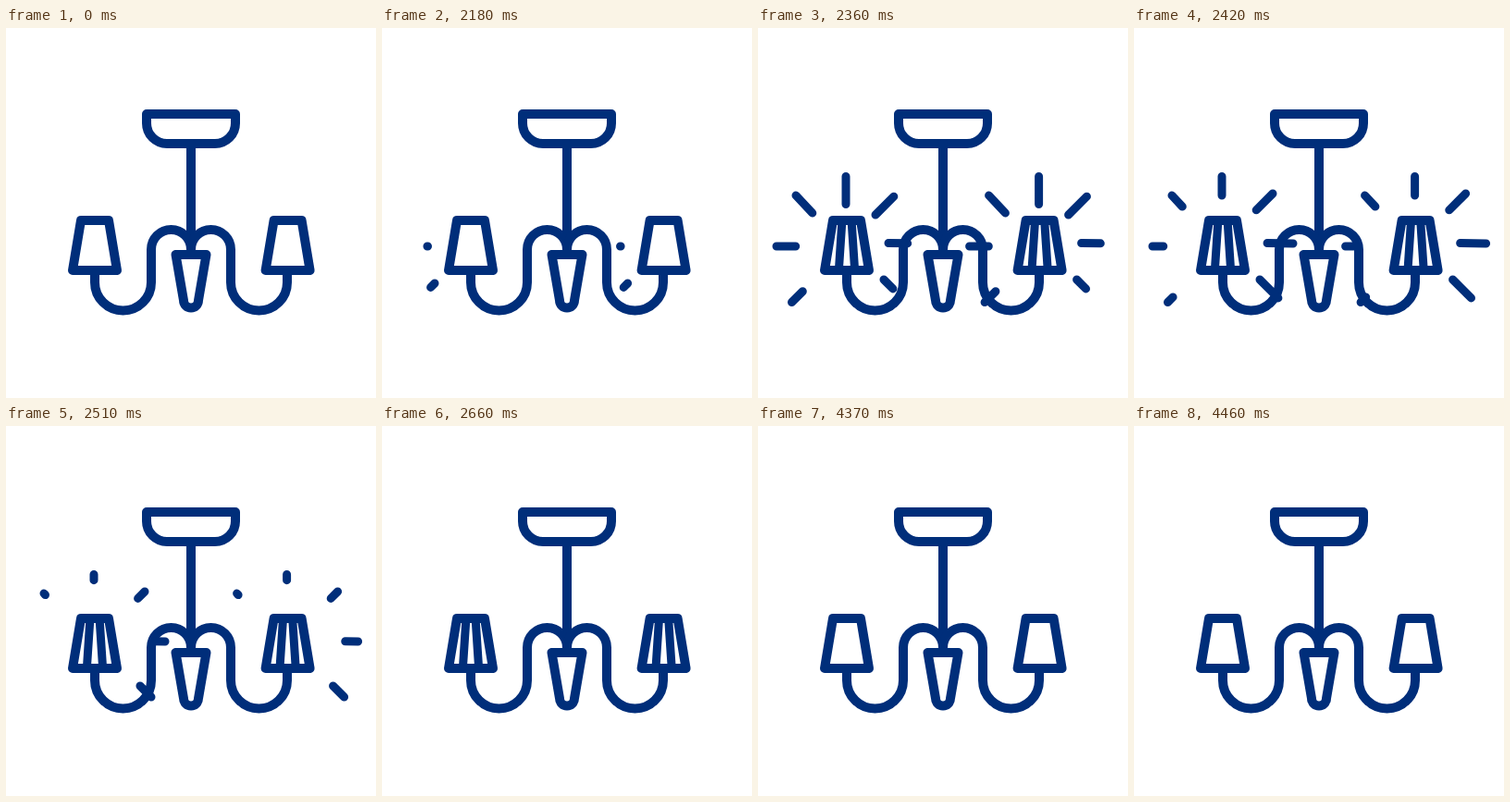
Recreate the animation shown at these times as an HTML page. Size 400 px wide and 400 px high, loop 4.49 s.

```html
<!DOCTYPE html>
<html lang="en">
<head>
<meta charset="utf-8">
<title>Chandelier</title>
<style>
html, body { margin: 0; width: 100%; height: 100%; overflow: hidden; background: #fff; }
svg { display: block; width: 100vw; height: 100vh; }
</style>
</head>
<body>
<svg viewBox="0 0 400 400" fill="none" stroke="#002e7a" stroke-width="10" stroke-linecap="round" stroke-linejoin="round">
  <defs>
    <path id="arm" d="M96 262V275A30.5 30.5 0 0 0 157 275V239.5A21.5 21.5 0 0 1 200 239.5"/>
    <g id="lamp">
      <path d="M81 208H111L120 262H72Z"/>
      <path class="pleats" stroke-width="9" d="M90.8 210L87.5 260M101.2 210L104.5 260"/>
      <path class="rays" stroke-width="9"/>
    </g>
  </defs>
  <path d="M152 93H248V103A22 22 0 0 1 226 125H174A22 22 0 0 1 152 103Z"/>
  <path d="M200 125V240"/>
  <use href="#arm"/>
  <use href="#arm" transform="translate(400) scale(-1 1)"/>
  <path d="M183.5 245H216.5L208 294.5A8 8 0 0 1 192 294.5Z"/>
  <use href="#lamp"/>
  <use href="#lamp" x="208.6"/>
</svg>
<script>
const LOOP = 4490, BURST = 2180, STEP = 30;
const pleats = document.querySelector('.pleats');
const rays = document.querySelector('.rays');

// Inner and outer end of each ray, in firing order
const RAYS = [
  [57, 276, 36.5, 296.5],
  [49.5, 236, 20, 236],
  [62.5, 204, 41, 181],
  [95, 192, 95, 160.5],
  [127, 202, 150, 179],
  [141, 232.5, 172, 233],
  [136, 272, 157, 293]
];

// Spans in which the shades are lit
const LIT = [[2360, 4250], [4310, 4370], [4430, 4460]];

const clamp = v => Math.min(1, Math.max(0, v));

function rayPath([x1, y1, x2, y2], i, step) {
  const head = clamp((step + 0.9 - 0.82 * i) / 4.2);
  const tail = clamp((step - 3.2 - 0.83 * i) / 6.6);
  if (head <= 0 || tail >= 1) return '';
  const at = p => `${x1 + (x2 - x1) * p} ${y1 + (y2 - y1) * p}`;
  return `M${at(tail)}L${at(head)}`;
}

function draw(time) {
  const step = Math.floor((time - BURST) / STEP);
  const active = step >= 0 && step < 16;
  rays.setAttribute('d', active ? RAYS.map((r, i) => rayPath(r, i, step)).join('') : '');
  const lit = LIT.some(([from, to]) => time >= from && time < to);
  pleats.setAttribute('visibility', lit ? 'visible' : 'hidden');
}

const start = performance.now();
function tick() {
  draw((performance.now() - start) % LOOP);
  requestAnimationFrame(tick);
}
tick();
</script>
</body>
</html>
```
